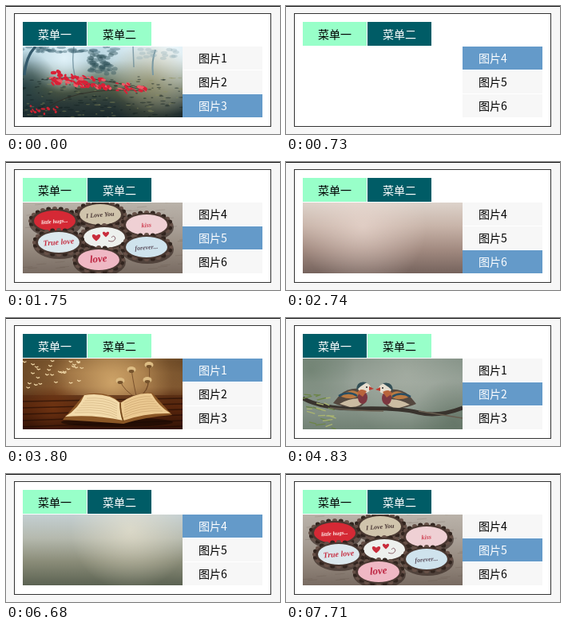
Animation, 343 px wide and 161 px high, one loop 8000 ms. Source, as an HTML page with a canvas:

```html
<!DOCTYPE html>
<html lang="zh-CN">
<head>
<meta charset="utf-8">
<style>
html, body { margin: 0; width: 100%; height: 100%; overflow: hidden; background: #f7f7f7; }
canvas { display: block; width: 343px; height: 161px; }
</style>
</head>
<body>
<canvas id="stage" width="343" height="161"></canvas>
<script>
const ctx = document.getElementById('stage').getContext('2d');
const LOOP = 8000;
const SANS = '"Noto Sans CJK SC", "Noto Sans CJK", "Noto Sans", sans-serif';
const PW = 200, PH = 89;

// [start ms, selected item, picture loaded]
const STEPS = [
  [0, 3, 1], [730, 4, 0], [760, 4, 1], [1690, 5, 0], [1750, 5, 1],
  [2710, 6, 0], [2740, 6, 1], [3800, 1, 1], [4730, 2, 0], [4830, 2, 1],
  [5690, 3, 0], [5750, 3, 1], [6680, 4, 1], [7710, 5, 1]
];

function rng(seed) {
  return () => (seed = (seed * 16807) % 2147483647) / 2147483647;
}
function rect(x, y, w, h, fill) {
  ctx.fillStyle = fill;
  ctx.fillRect(x, y, w, h);
}
function ell(x, y, rx, ry, fill, turn = 0) {
  ctx.fillStyle = fill;
  ctx.beginPath();
  ctx.ellipse(x, y, rx, ry, turn, 0, 7);
  ctx.fill();
}
function shape(d, fill) {
  ctx.fillStyle = fill;
  ctx.fill(new Path2D(d));
}
function line(d, color, width = 1) {
  ctx.strokeStyle = color;
  ctx.lineWidth = width;
  ctx.stroke(new Path2D(d));
}
function text(s, x, y, color, font = '14px ' + SANS) {
  ctx.font = font;
  ctx.fillStyle = color;
  ctx.fillText(s, x, y);
}
function backdrop(...colors) {
  const g = ctx.createLinearGradient(0, 0, 0, PH);
  colors.forEach((c, i) => g.addColorStop(i / (colors.length - 1), c));
  rect(0, 0, PW, PH, g);
}
function glow(x, y, r, rgb, alpha) {
  const g = ctx.createRadialGradient(x, y, 0, x, y, r);
  g.addColorStop(0, `rgba(${rgb},${alpha})`);
  g.addColorStop(1, `rgba(${rgb},0)`);
  rect(0, 0, PW, PH, g);
}

function book() {
  backdrop('#80592f', '#93683a', '#8a5f35', '#55280f', '#4a1f0b', '#381507');
  glow(112, 30, 75, '226,184,120', 0.75);
  glow(0, 20, 60, '70,44,20', 0.5);
  glow(200, 5, 50, '85,55,27', 0.5);
  const table = ctx.createLinearGradient(0, 46, 0, PH);
  table.addColorStop(0, 'rgba(86,43,18,.75)');
  table.addColorStop(0.35, 'rgba(90,38,12,.9)');
  table.addColorStop(1, 'rgba(50,18,6,.95)');
  rect(0, 46, PW, PH - 46, table);
  glow(38, 62, 36, '140,68,24', 0.45);
  for (let i = 0; i < 6; i++) line(`M0 ${54 + i * 8} L200 ${50 + i * 7}`, 'rgba(30,10,4,.6)', 1.3);

  const r = rng(31);
  for (let i = 0; i < 30; i++) {
    const x = 2 + r() * 76, y = 2 + r() * 36;
    line(`M${x - 2} ${y - 1.5} L${x} ${y} L${x + 2.5} ${y - 1}`, '#f0d8a8', 1.2);
  }
  for (const [x, y] of [[122, 28], [136, 14], [158, 8], [156, 27]]) {
    line(`M${x} ${y} Q${x + 4} 40 143 50`, '#6b4524', 0.8);
    ell(x, y, 5.5, 4, '#ddbd84');
    ell(x, y + 2, 3.5, 2, '#76532c');
  }
  ell(118, 80, 70, 6, 'rgba(25,8,3,.65)');
  shape('M50 77 L74 49 L78 45 Q108 40 122 56 Q143 42 162 43 L187 71 Q150 74 126 82 Q88 79 50 77Z', '#8b5726');
  shape('M53 73 Q70 63 77 46 Q106 42 122 56 L126 78 Q90 70 53 73Z', '#f3dbab');
  shape('M122 56 Q142 42 161 44 Q170 60 185 69 Q154 68 126 78Z', '#ecca92');
  line('M122 56 Q122 68 126 79', '#744618', 1.8);
  for (let i = 0; i < 7; i++) {
    const y = 50 + i * 3, dx = i * 2.5;
    line(`M${80 - dx} ${y} Q103 ${y - 2} 118 ${y + 7}`, 'rgba(150,105,58,.4)', 0.6);
    line(`M127 ${y + 6} Q146 ${y - 4} ${160 + dx} ${y - 2}`, 'rgba(150,105,58,.45)', 0.6);
  }
}

function duck(x, y, dir) {
  ctx.save();
  ctx.translate(x, y);
  ctx.scale(dir, 1);
  shape('M-25 12 L-16 1 Q-3 -9 12 -5 Q22 7 10 16 Q-7 20 -25 12Z', '#54483f');
  shape('M-17 13 Q1 3 15 8 Q9 18 -4 17Z', '#cbbca2');
  shape('M-15 4 Q-3 -9 8 0 Q3 10 -15 4Z', '#b97a43');
  line('M-18 3 Q-5 -4 5 3', '#284e64', 2.5);
  ell(12, 5, 6, 8, '#7c3740');
  ell(14, -7, 8, 6.5, '#e7dfd0');
  shape('M4 -4 Q4 -17 17 -14 Q10 -10 4 -4Z', '#345057');
  shape('M5 -1 Q9 -8 17 -3 L12 4Z', '#b9643b');
  shape('M20 -9 L26 -6 L20 -4Z', '#bb3d32');
  ell(17, -8, 1, 1, '#222');
  ctx.restore();
}
function birds() {
  backdrop('#849287', '#95a096', '#88958a', '#718174');
  glow(130, 20, 80, '179,185,174', 0.5);
  glow(10, 15, 55, '91,113,93', 0.5);
  glow(190, 80, 55, '85,104,88', 0.5);
  line('M0 50 Q25 64 73 63 T145 68 T200 62', '#39332d', 5);
  line('M34 62 Q70 66 101 66 M145 66 Q170 70 200 75', '#685e50', 1.5);
  const r = rng(9);
  for (let i = 0; i < 23; i++) {
    const x = r() * 36, y = 42 + r() * 45;
    line(`M${x} ${y} l${5 + r() * 8} ${r() * 8 - 4}`, i % 2 ? '#a9b470' : '#6d8548', 1.4);
  }
  duck(63, 44, 1);
  duck(117, 45, -1);
}

function flowers() {
  backdrop('#c3dfea', '#b4d0d9', '#7d9084', '#4e5a46', '#2b3a38', '#1b292c');
  glow(175, 12, 75, '246,252,255', 1);
  glow(52, 14, 45, '226,243,250', 0.95);
  glow(160, 48, 55, '128,122,74', 0.6);
  glow(0, 50, 45, '24,54,66', 0.75);
  const r = rng(57);
  line('M2 36 Q4 12 16 0', '#345a6c', 3.5);
  line('M64 0 Q61 20 65 36 M138 0 L139 26', 'rgba(92,128,144,.65)', 1.5);
  line('M163 36 Q161 18 166 4', '#7898a2', 2);
  for (let i = 0; i < 36; i++) ell(r() * 130, r() * 7, 2 + r() * 5, 1.8, 'rgba(60,98,112,.42)');
  for (let i = 0; i < 40; i++) ell(84 + r() * 34, 7 + r() * 27, 3 + r() * 3, 2.5, 'rgba(42,77,86,.4)');
  for (let i = 0; i < 18; i++) ell(146 + r() * 46, 3 + r() * 12, 4, 2, 'rgba(145,174,184,.35)');
  for (let i = 0; i < 210; i++) {
    const y = 38 + r() * 51;
    ell(r() * PW, y, 1 + r() * 3, 0.8, i % 3 ? 'rgba(18,31,31,.45)' : 'rgba(142,144,92,.4)');
  }
  line('M20 87 Q55 48 155 56 M30 40 Q92 35 150 55', '#302b25', 0.8);
  for (let i = 0; i < 95; i++) {
    const u = Math.pow(r(), 1.25);
    const y = 38 + u * 17 + (r() - 0.5) * (18 - u * 10);
    ell(32 + u * 122, y, 1.2 + r() * 3, 0.8 + r() * 1.5, i % 4 ? '#d92137' : '#f05a66', r());
  }
  for (let i = 0; i < 14; i++) {
    ell(r() * 46, 74 + r() * 14, 1 + r() * 2.5, 0.8 + r() * 1.5, '#c82131', r());
  }
}

function cap(x, y, fill, label, ink, size = 8) {
  ell(x + 1, y + 3, 33, 18, 'rgba(45,30,25,.6)');
  for (let i = 0; i < 24; i++) {
    const a = i * Math.PI / 12;
    ell(x + 30 * Math.cos(a), y + 15.5 * Math.sin(a), 3, 2.6, i % 2 ? '#32251f' : '#665047');
  }
  ell(x, y, 29, 15, '#493831');
  ell(x, y, 26, 13, fill);
  ctx.save();
  ctx.translate(x, y + 3);
  ctx.rotate(-0.08);
  ctx.textAlign = 'center';
  text(label, 0, 0, ink, `italic bold ${size}px "Liberation Serif", serif`);
  ctx.restore();
}
function heart(x, y, s) {
  shape(`M${x} ${y + s} C${x - 2 * s} ${y - s / 2} ${x - s} ${y - 1.5 * s} ${x} ${y - s / 2} C${x + s} ${y - 1.5 * s} ${x + 2 * s} ${y - s / 2} ${x} ${y + s}Z`, '#c92d3c');
}
function caps() {
  backdrop('#b9b2a9', '#aaa198', '#94887d', '#786b62');
  const r = rng(83);
  for (let i = 0; i < 70; i++) line(`M${r() * 200} ${r() * 89} l12 -1`, 'rgba(80,65,55,.25)', 0.7);
  cap(97, 15, '#d0c4ac', 'I Love You', '#4b3835');
  cap(40, 23, '#d52935', 'little hugs...', '#fff0ed', 7);
  cap(155, 28, '#efd0d4', 'kiss', '#cf4053');
  cap(102, 44, '#edf0ed', '', '#c92d3c');
  heart(92, 44, 4.5);
  heart(104, 40, 3.5);
  line('M107 48 q7 3 9 -3 q-2 -5 -5 -1', '#8c656d', 1);
  cap(45, 50, '#dce8ed', 'True love', '#c63245', 10);
  cap(155, 56, '#cfe3ed', 'forever...', '#5e5260');
  cap(95, 72, '#efb8c4', 'love', '#bd2642', 13);
}

function dusk() {
  backdrop('#c3cfd2', '#b5b9ae', '#8a8c78', '#5b6252');
  glow(135, 20, 75, '240,232,210', 0.6);
}
function blush() {
  backdrop('#ddd3cb', '#c8b4a9', '#a28a80', '#75635d');
  glow(75, 30, 80, '240,222,214', 0.6);
}

const PICTURES = [book, birds, flowers, dusk, caps, blush];

function tab(x, label, on) {
  rect(x, 20, 80, 30, on ? '#005c66' : '#98ffc9');
  text(label, x + 19, 41, on ? '#fff' : '#000');
}
function draw(item, loaded) {
  rect(0, 0, 343, 161, '#f7f7f7');
  rect(0, 0, 343, 1, '#111');
  rect(10, 9, 322, 143, '#333');
  rect(11, 10, 320, 141, '#fff');
  const second = item > 3;
  tab(21, '菜单一', !second);
  tab(102, '菜单二', second);
  const first = second ? 4 : 1;
  for (let i = 0; i < 3; i++) {
    const on = first + i === item, y = 51 + i * 30;
    rect(221, y, 100, 29, on ? '#649ac9' : '#f7f7f7');
    text('图片' + (first + i), 241, y + 20, on ? '#fff' : '#000');
  }
  if (!loaded) return;
  ctx.save();
  ctx.translate(21, 51);
  ctx.beginPath();
  ctx.rect(0, 0, PW, PH);
  ctx.clip();
  PICTURES[item - 1]();
  ctx.restore();
}

let shown;
function frame() {
  const t = performance.now() % LOOP;
  const step = STEPS.findLast(s => s[0] <= t);
  if (step !== shown) {
    shown = step;
    draw(step[1], step[2]);
  }
  requestAnimationFrame(frame);
}
frame();
</script>
</body>
</html>
```
